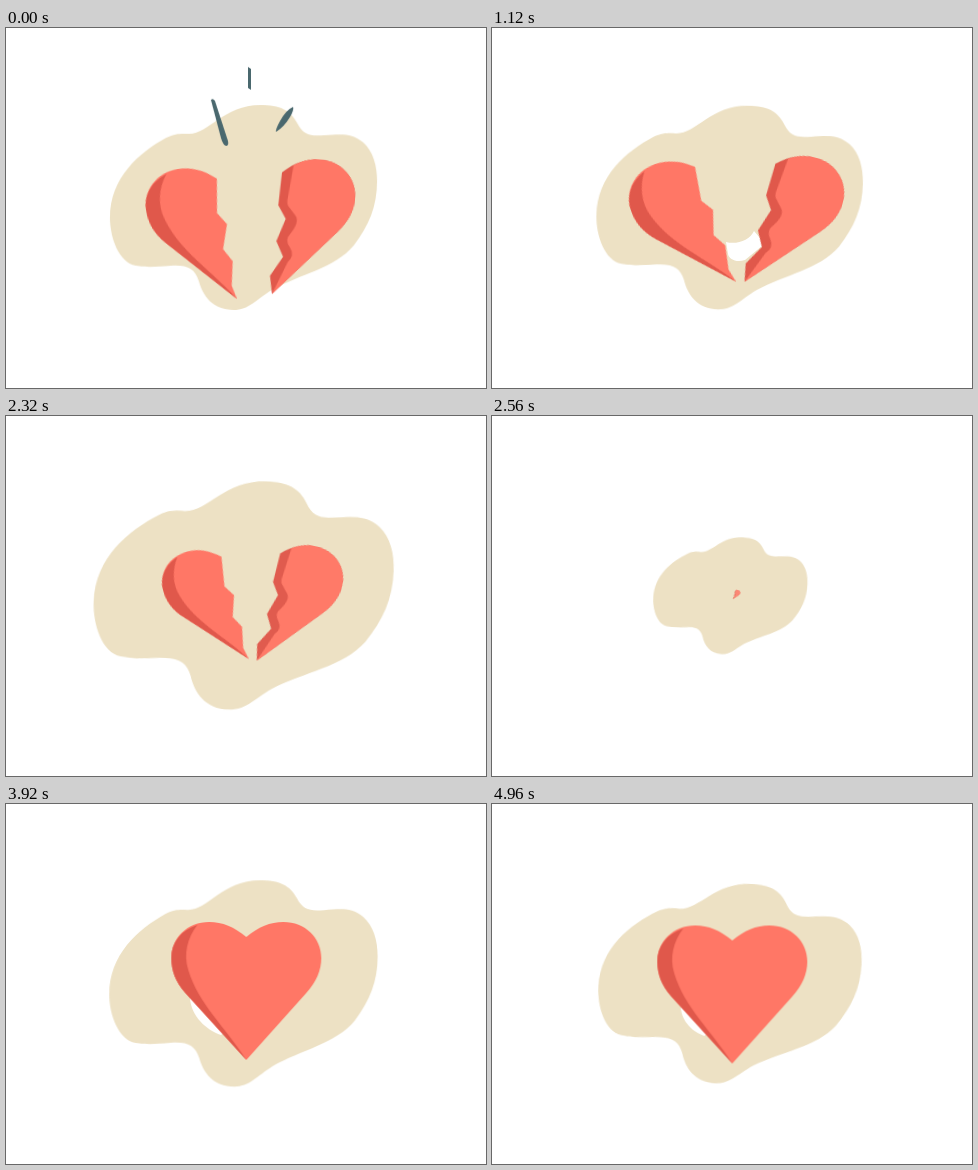
Recreate the animation shown at these times as an HTML page. Size 480x360 px, loop 5 s.

```html
<!DOCTYPE html>
<html lang="en">
<head>
<meta charset="utf-8">
<title>Broken heart</title>
<style>
html, body { margin: 0; width: 100%; height: 100%; overflow: hidden; background: #fff; }
svg { display: block; width: 480px; height: 360px; }
g[id], .ray, .gap { animation: 5s linear infinite; }

.sand { fill: #ede1c4; }
.coral { fill: #ff7766; }
.dark { fill: #e0584b; }
.gap { fill: #fff; }
.ray { fill: #4a686e; animation-name: ray; }

#pop { animation-name: pop; }
#sway { animation-name: sway; animation-timing-function: ease-in-out; }
#left { animation-name: left; animation-timing-function: ease-in-out; }
#right { animation-name: right; animation-timing-function: ease-in-out; }
#heart { animation-name: heart; animation-timing-function: ease-in-out; }
#gapWide { animation-name: gapWide; animation-timing-function: step-end; }
#gapSmall { animation-name: gapSmall; animation-timing-function: step-end; }
#cut { animation-name: cut; animation-timing-function: step-end; }
#sliver { animation-name: sliver; }

/* sand shape: swell, collapse, grow back */
@keyframes pop {
  0%, 43.5% { transform: translate(239px, 180px) scale(1); }
  44.8% { transform: translate(239px, 180px) scale(1.035); }
  47.2% { transform: translate(239px, 180px) scale(1.18); }
  49.6% { transform: translate(239px, 180px) scale(.92); }
  51.2% { transform: translate(239px, 180px) scale(.59); }
  53.6%, 58% { transform: translate(239px, 180px) scale(0); }
  65.6% { transform: translate(239px, 180px) scale(.81); }
  68.8% { transform: translate(239px, 180px) scale(.94); }
  75%, 100% { transform: translate(239px, 180px) scale(1); }
}
@keyframes sway {
  0% { transform: rotate(.2deg); }
  10%, 100% { transform: rotate(3deg) scale(.98); }
  32%, 78.5% { transform: rotate(-.3deg) scale(1.006); }
  55% { transform: rotate(3deg) scale(.98); }
}

/* halves turn about their lower tips */
@keyframes left {
  0% { transform: translate(231px, 271px) rotate(-9.5deg); }
  9.6% { transform: translate(245px, 256px) rotate(-23.5deg); }
  36.8% { transform: translate(243px, 251px) rotate(-15deg); }
  45% { transform: translate(243px, 252px) rotate(-15deg) scale(1); }
  50.6%, 100% { transform: translate(242px, 184px) rotate(-15deg) scale(0); }
}
@keyframes right {
  0% { transform: translate(266px, 266px) rotate(4.7deg); opacity: 1; }
  9.6% { transform: translate(253px, 256px) rotate(17.5deg); }
  36.8% { transform: translate(252px, 251px) rotate(11.2deg); }
  45% { transform: translate(252px, 252px) rotate(12deg) scale(1); opacity: 1; }
  51.2% { transform: translate(241px, 183px) rotate(15deg) scale(.072); opacity: .85; }
  52%, 100% { transform: translate(241px, 183px) rotate(15deg) scale(0); opacity: 0; }
}
@keyframes heart {
  0%, 58.4% { transform: translate(240px, 180px) rotate(12deg) scale(0); }
  65.6% { transform: translate(237px, 248px) rotate(2.3deg) scale(1.05); }
  70.4% { transform: translate(240px, 255px) rotate(0deg) scale(1); }
  78.4% { transform: translate(240.3px, 256px) rotate(0deg) scale(1); }
  100% { transform: translate(240.3px, 259.5px) rotate(0deg) scale(1); }
}

@keyframes ray {
  0% { transform: none; opacity: 1; }
  3.2% { transform: translate(var(--x), var(--y)); opacity: 1; }
  4.8%, 100% { transform: translate(var(--x), var(--y)); opacity: 0; }
}

@keyframes gapWide { 0% { opacity: 0; } 8% { opacity: 1; } 14.4%, 100% { opacity: 0; } }
@keyframes gapSmall { 0% { opacity: 0; } 14.4% { opacity: 1; } 44.8%, 100% { opacity: 0; } }
@keyframes cut { 0% { opacity: 0; } 64% { opacity: 1; } 67.2%, 100% { opacity: 0; } }
@keyframes sliver {
  0%, 70.3% { transform: none; opacity: 0; }
  70.4%, 78.4% { transform: none; opacity: 1; }
  100% { transform: translate(51px, 58.75px) scale(.75); opacity: 1; }
}
</style>
</head>
<body>
<svg viewBox="0 0 480 360">
  <defs>
    <path id="shade" d="M-49-135C-66-129-75-117-75-102C-75-90-71-78-61-67L0 0C-20-32-48-56-58-90C-63-106-59-122-49-135Z"/>
  </defs>

  <g id="pop"><g id="sway">
    <path class="sand" transform="translate(-239 -180)" d="M182 106C202 107 217 77 254 77C274 77 284 82 291 95C297 107 304 108 318 107C334 106 345 104 357 114C367 123 371 137 371 153C371 178 363 197 348 217C329 240 294 246 266 262C250 272 243 282 228 282C207 282 197 268 193 253C189 241 182 237 165 238C150 239 143 240 130 238C113 235 104 210 104 190C104 150 133 125 160 110C170 105 176 106 182 106Z"/>
  </g></g>

  <path id="gapWide" class="gap" d="M215 207H251C266 207 268 193 268 187C269 179 276 174 281 175L286 190L270 225L254 250C248 253 240 250 238 243L225 212ZM136 167C122 170 122 201 142 207Z"/>
  <path id="gapSmall" class="gap" d="M234 214C245 217 258 212 262 203L268 210L270 218L253 232C244 235 237 231 236 226Z"/>
  <path id="cut" class="gap" d="M283 90H362V150L347 157Q344 151 340 156C333 169 318 182 303 183L285 170Z"/>
  <path id="sliver" class="gap" d="M184 194C185 212 200 226 215 231L222 225L190 190Z"/>

  <g id="left">
    <path class="coral" d="M0-122C-12-133-24-138-37-138C-59-138-75-122-75-102C-75-90-71-78-61-67L0 0L-3-14L2-38L-5.5-51.5L2.5-75.5L-5.5-88Z"/>
    <use href="#shade" class="dark"/>
  </g>
  <g id="right">
    <path class="dark" d="M0-122C12-133 24-138 37-138C59-138 75-122 75-102C75-90 70-78 60-67L0 0L-3.5-18L8-38L0-53L7.5-76L-1-89Z"/>
    <path class="coral" d="M11-130C20-136 29-138 37-138C59-138 75-122 75-102C75-90 70-78 60-67L0 0L13-33Q20-40 14-48Q8-55 13-61Q22-74 17-80L9-89Q7-92 8-98Z"/>
  </g>
  <g id="heart">
    <path class="coral" d="M0-123C-12-133-24-138-37-138C-59-138-75-122-75-102C-75-90-71-78-61-67L0 0L60-67C70-78 75-90 75-102C75-122 59-138 37-138C24-138 12-133 0-123Z"/>
    <use href="#shade" class="dark"/>
  </g>

  <path class="ray" style="--x:-10px;--y:-28px" d="M205 72Q207 70 209 73L222 113Q223 118 220 118Q217 117 215 110Z"/>
  <path class="ray" style="--x:0px;--y:-15px" d="M242 39L245 41V62L242 60Z"/>
  <path class="ray" style="--x:13px;--y:-20px" d="M287 79Q288 82 284 89Q278 99 270 104Q269 102 274 93Q280 82 287 79Z"/>
</svg>
</body>
</html>
```
